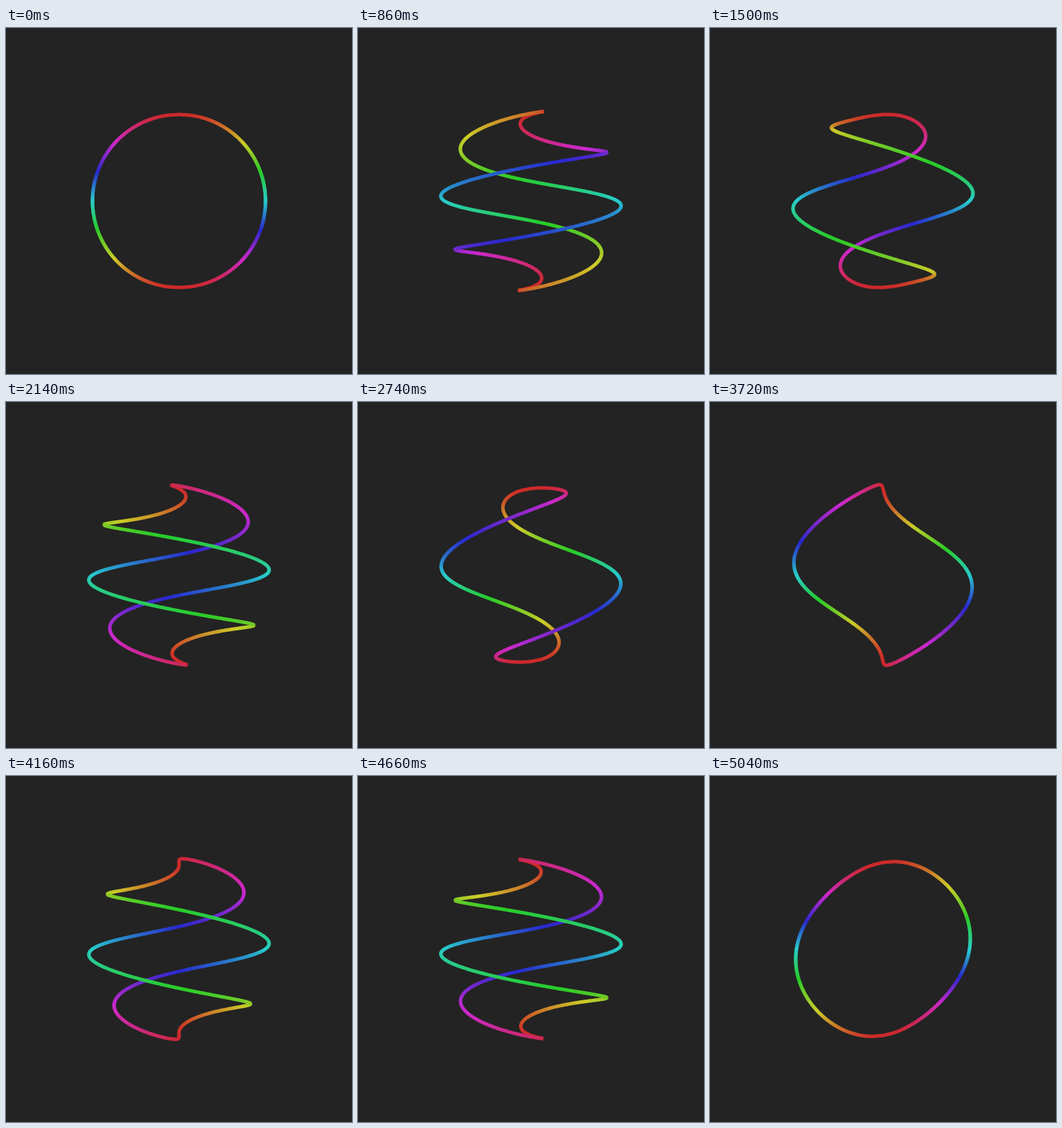
An HTML page with a canvas for the animation above (5.06 s loop, 500 px wide and 500 px high).

```html
<!DOCTYPE html>
<html lang="en">
<head>
<meta charset="utf-8">
<title>Twisting rainbow ring</title>
<style>
  html, body { margin: 0; width: 100%; height: 100%; overflow: hidden; background: #232323; }
  canvas { display: block; width: 500px; height: 500px; }
</style>
</head>
<body>
<canvas id="stage" width="500" height="500"></canvas>
<script>
const ctx = document.getElementById('stage').getContext('2d');
const SIZE = 500, MID = SIZE / 2;
const R = 125;
const CAMERA = MID / Math.tan(Math.PI / 6);
const LOOP = 5060, TICK = 20;
const SWING = 127;    // ticks in one full twist and back
const PHASE = 0.05;   // radians per tick
const OVERLAP = 0.4;  // hides seams between segments

// The flat ring is held for two ticks at the start of each swing.
function twistAt(ms) {
  const tick = Math.floor((ms % LOOP) / TICK);
  const step = Math.max(0, tick % SWING - 1);
  return 2 * Math.PI * Math.sin(step * PHASE);
}

// side is 1 for the half that starts on the right, -1 for the left
function project(y, side, twist) {
  const r = Math.sqrt(R * R - y * y);
  const turn = twist * y / R;
  const z = side * r * Math.sin(turn);
  const scale = CAMERA / (CAMERA - z);
  return { x: MID + side * r * Math.cos(turn) * scale, y: MID + y * scale, z };
}

function segments(twist) {
  const list = [];
  for (const side of [1, -1]) {
    let a = project(-R, side, twist);
    for (let y = 1 - R; y <= R; y++) {
      const b = project(y, side, twist);
      list.push({ a, b, z: a.z + b.z, hue: 180 + side * 180 * (y - 0.5) / R });
      a = b;
    }
  }
  return list.sort((p, q) => p.z - q.z);
}

function draw(ms) {
  ctx.fillStyle = '#232323';
  ctx.fillRect(0, 0, SIZE, SIZE);
  ctx.lineWidth = 5;
  ctx.lineCap = 'butt';
  for (const { a, b, hue } of segments(twistAt(ms))) {
    const dx = b.x - a.x, dy = b.y - a.y;
    const grow = OVERLAP / (Math.hypot(dx, dy) || 1);
    ctx.strokeStyle = `hsl(${hue}, 66.7%, 48%)`;
    ctx.beginPath();
    ctx.moveTo(a.x - dx * grow, a.y - dy * grow);
    ctx.lineTo(b.x + dx * grow, b.y + dy * grow);
    ctx.stroke();
  }
}

const start = performance.now();
function frame() {
  draw(performance.now() - start);
  requestAnimationFrame(frame);
}
frame();
</script>
</body>
</html>
```
